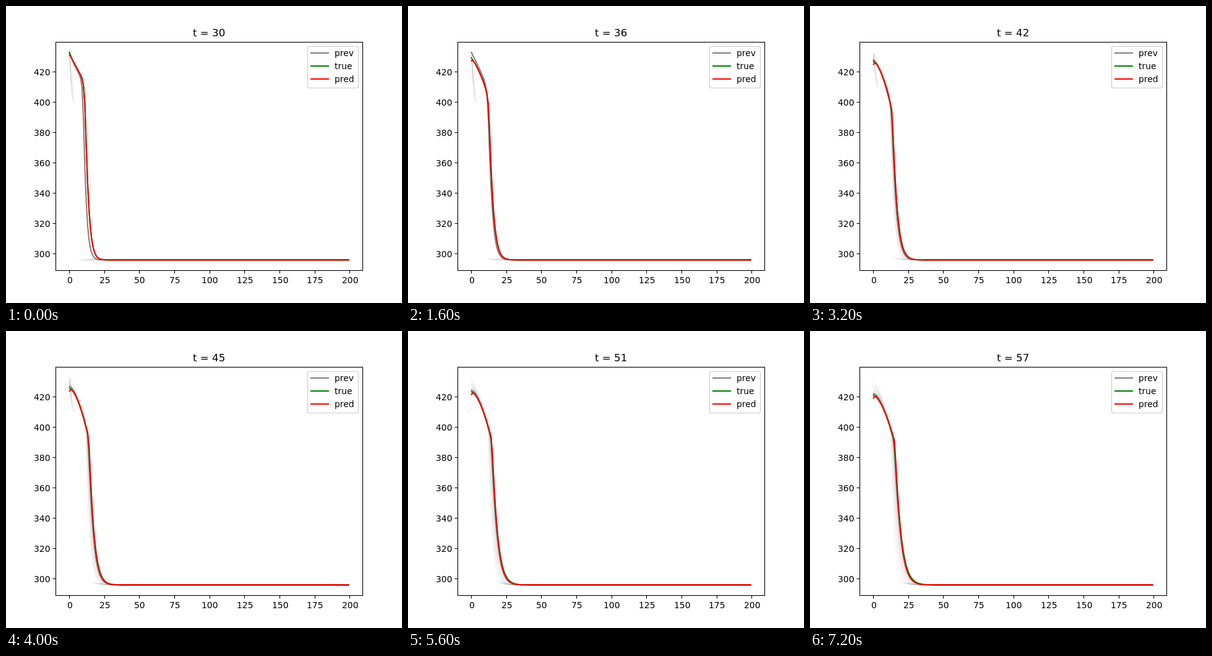
Animation of 640 by 480 pixels, one loop 8000 ms. Source, as an HTML page:

```html
<!DOCTYPE html>
<html lang="en">
<head>
<meta charset="utf-8">
<title>Prediction plot</title>
<style>
html, body { margin: 0; width: 100%; height: 100%; overflow: hidden; background: #fff; }
svg { display: block; width: 640px; height: 480px; font: 13.89px "DejaVu Sans", sans-serif; }
path { fill: none; stroke-linejoin: round; stroke-linecap: square; }
</style>
</head>
<body>
<svg id="plot" viewBox="0 0 640 480"></svg>
<script>
const svg = document.getElementById('plot');
const STEP = 800, FRAMES = 10, FIRST = 30, STRIDE = 3;
const GREY = '#808080', GREEN = '#008000', RED = '#ff0000';
const DIGIT = 8.84;   // advance of one tick label digit
const FLAT = 410.4;   // height of the cold end
const px = i => 102.55 + 2.2664 * i;
const py = v => 400.4 - (v - 300) * 2.4533;
const clamp = v => Math.max(0, Math.min(1, v));

// A hot shoulder that cools and widens, then a stretched exponential drop
function profile(t, isTrue) {
  const r = clamp((t - 27) / 30);
  const late = isTrue ? clamp((t - FIRST) / 27) : 0;
  const knee = 9.7 + 5.4 * Math.pow(r, .6) - .35 * late;
  const kneeY = 160 + 18 * r;
  const width = (2.3 + 2 * Math.pow(r, .8)) * (1 + .1 * late);
  const top = t < 35 ? 75 : 84 + .95 * (t - 36);
  const early = clamp(1 - (r - .1) / .4);

  return i => {
    if (i > knee) {
      const d = (i - knee) / width;
      return FLAT - (FLAT - kneeY) * Math.exp(-Math.pow(d, 1.15));
    }
    const u = i / knee;
    const bumpy = .55 * Math.pow(u, .85) + .45 * Math.pow(u, 14);
    const smooth = Math.pow(u, 1.65);
    const miss = isTrue ? 0 : 4.5 * Math.exp(-1.5 * i);
    return top + (kneeY - top) * (early * bumpy + (1 - early) * smooth) + miss;
  };
}

function curve(t, isTrue) {
  const y = profile(t, isTrue);
  let s = 'M';
  for (let i = 0; i < 200; i++) s += `${px(i).toFixed(2)} ${y(i).toFixed(2)} `;
  return s;
}

const line = (d, color, width = 2.08, alpha = 1) =>
  `<path d="${d}" stroke="${color}" stroke-width="${width}" stroke-opacity="${alpha}"/>`;
const label = (x, y, s, extra = '') => `<text x="${x}" y="${y}" ${extra}>${s}</text>`;

// Faded remains of the earliest curves
function streaks(t) {
  if (t > 45) return '';
  const drop = t < 40 ? 79 : 51;
  let s = '';
  for (let i = 0; i < 5; i++) {
    const x = 105 + 1.5 * i, y = 80 + drop * (1 - Math.pow((i - 3) / 4.5, 2));
    s += line(`M103 79Q${(x + 102) / 2} ${(y + 95) / 2} ${x} ${y}`, GREY, .8, .2);
  }
  return s;
}

function wisps(t) {
  const x = 118 + 28 * Math.pow((t - FIRST) / 27, .6);
  const rise = Math.min(5.5, (t - FIRST) * .28);
  let s = '';
  for (let i = 0; i < 4; i++) {
    const a = x + i * 4, y = FLAT - rise + i * .3;
    s += line(`M${a} ${y}Q${a + 7} ${FLAT - .5} ${x + 32} ${FLAT}`, GREY, 1, .17);
  }
  return s + line(`M${x + 14} ${FLAT - 2.2}L${x + 30} ${FLAT - 1}`, GREY, 1.2, .2);
}

function data(t) {
  let s = streaks(t) + wisps(t);
  for (let g = 33; g <= t - 2 * STRIDE; g += STRIDE) {
    const age = (t - g) / STRIDE;
    s += line(curve(g, true), GREY, 1.4, .32 * Math.pow(.8, age - 1));
  }
  return s + line(curve(t - STRIDE, true), GREY)
    + line(curve(t, true), GREEN) + line(curve(t, false), RED);
}

function axes() {
  let ticks = '', s = '';
  for (let v = 0; v <= 200; v += 25) {
    ticks += `M${Math.floor(px(v)) + .5} 428V432`;
    s += label(Math.round(px(v) - String(v).length * DIGIT / 2 + .4), 448, v);
  }
  for (let v = 300; v <= 420; v += 20) {
    ticks += `M80 ${Math.floor(py(v)) + .5}H76`;
    s += label(45, Math.round(py(v) + 5.5), v);
  }
  return s + line(ticks, '#000', 1.11)
    + '<rect x="80.5" y="58.5" width="496" height="369" fill="none" stroke="#000" stroke-width="1.11"/>';
}

function legend() {
  let s = '<rect x="487.5" y="65.5" width="82" height="67" rx="2.8" fill="#fff" fill-opacity=".8" stroke="#ccc" stroke-width="1.2"/>';
  Object.entries({ prev: GREY, true: GREEN, pred: RED }).forEach(([name, color], i) => {
    const y = 76 + 21 * i;
    s += line(`M493 ${y}H521`, color) + label(531, y + 5, name);
  });
  return s;
}

svg.innerHTML = '<g id="data"></g>' + axes() + legend()
  + label(302, 49, '', 'id="title" font-size="16.67"');
const layer = document.getElementById('data');
const title = document.getElementById('title');
let shown = -1;

function draw(now) {
  const step = Math.floor(now / STEP) % FRAMES;
  if (step === shown) return;
  shown = step;
  const t = FIRST + STRIDE * step;
  title.textContent = 't = ' + t;
  layer.innerHTML = data(t);
}

const start = performance.now();
function tick() {
  draw(performance.now() - start);
  requestAnimationFrame(tick);
}
tick();
</script>
</body>
</html>
```
